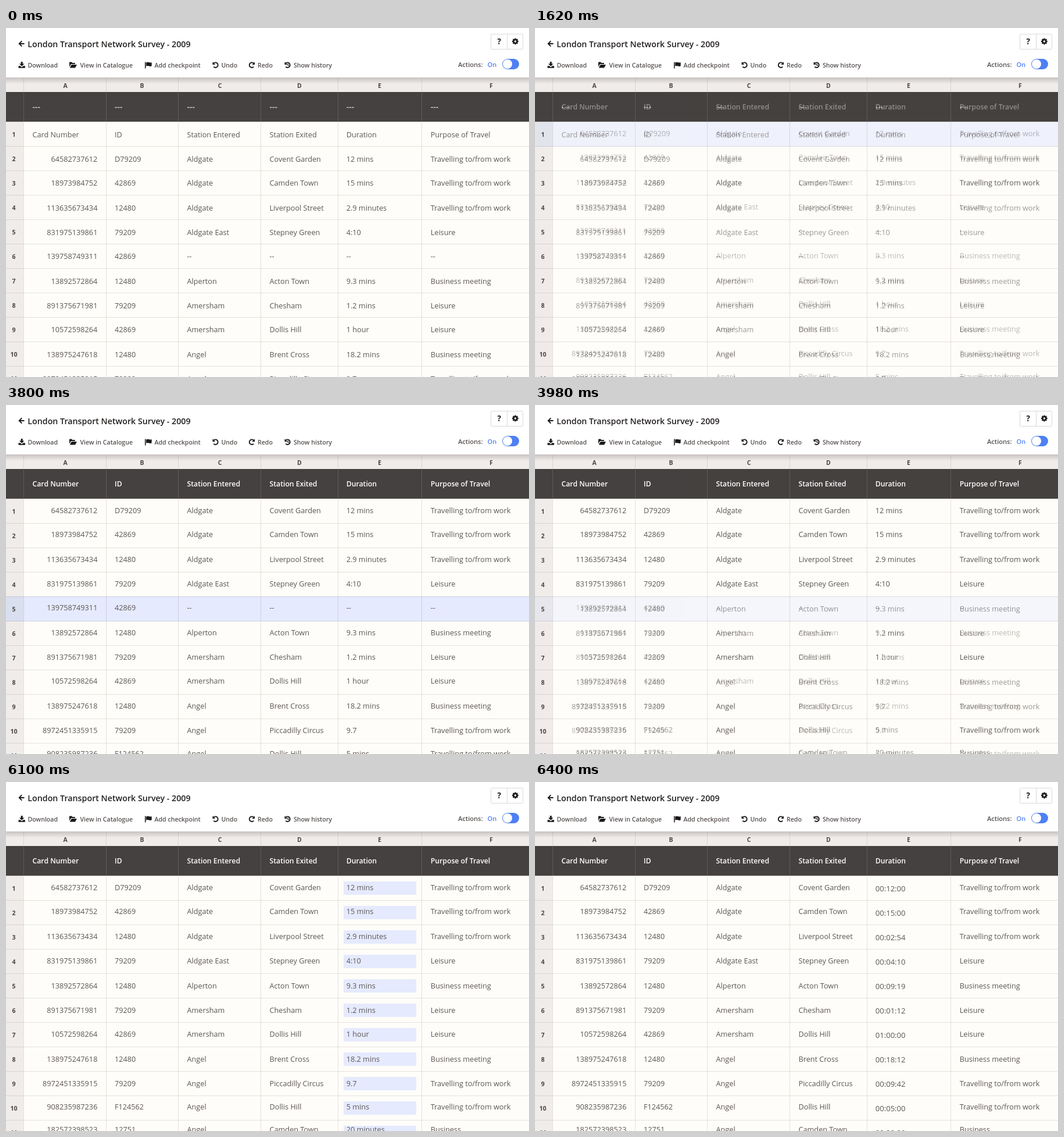
Write an HTML page that moves like this. It is 900 px wide and 600 px high and loops after 8.4 s.

```html
<!DOCTYPE html>
<html lang="en">
<head>
<meta charset="utf-8">
<title>Survey table</title>
<style>
  html, body { margin: 0; width: 100%; height: 100%; overflow: hidden; background: #fff; }
  svg { display: block; width: 900px; height: 600px; font-family: "Open Sans", "Noto Sans", sans-serif; }
  .cell { font-size: 12.7px; fill: #5b5654; }
  .time { font-size: 13.1px; }
  .head { font-size: 12.25px; font-weight: 600; fill: #fff; }
  .blank { font-size: 14px; font-weight: 600; fill: #d8d4d2; }
  .label { font-size: 10.5px; font-weight: 700; fill: #4b4644; text-anchor: middle; }
  .tool { font-size: 10.6px; font-weight: 600; fill: #55504e; }
  .title { font-size: 14.25px; font-weight: 600; fill: #23201f; }
  .end { text-anchor: end; }
  .ink { fill: #1c1a19; }
  .stroke { fill: none; stroke: #1c1a19; stroke-width: 1.9; }
</style>
</head>
<body>
<svg id="stage" viewBox="0 0 900 600"></svg>
<script>
const LOOP = 8400;
const ROW = 42;
const TOP = 161;
const edges = [30, 172, 296, 438, 571, 715];
const textX = [45.5, 187, 311.5, 453.5, 585.7, 730.7];
const headings = ['Card Number', 'ID', 'Station Entered', 'Station Exited', 'Duration', 'Purpose of Travel'];
const WORK = 'Travelling to/from work', MEETING = 'Business meeting';

const rows = [
  headings,
  ['64582737612', 'D79209', 'Aldgate', 'Covent Garden', '12 mins', WORK, '00:12:00'],
  ['18973984752', '42869', 'Aldgate', 'Camden Town', '15 mins', WORK, '00:15:00'],
  ['113635673434', '12480', 'Aldgate', 'Liverpool Street', '2.9 minutes', WORK, '00:02:54'],
  ['831975139861', '79209', 'Aldgate East', 'Stepney Green', '4:10', 'Leisure', '00:04:10'],
  ['139758749311', '42869', '--', '--', '--', '--'],
  ['13892572864', '12480', 'Alperton', 'Acton Town', '9.3 mins', MEETING, '00:09:19'],
  ['891375671981', '79209', 'Amersham', 'Chesham', '1.2 mins', 'Leisure', '00:01:12'],
  ['10572598264', '42869', 'Amersham', 'Dollis Hill', '1 hour', 'Leisure', '01:00:00'],
  ['138975247618', '12480', 'Angel', 'Brent Cross', '18.2 mins', MEETING, '00:18:12'],
  ['8972451335915', '79209', 'Angel', 'Piccadilly Circus', '9.7', WORK, '00:09:42'],
  ['908235987236', 'F124562', 'Angel', 'Dollis Hill', '5 mins', WORK, '00:05:00'],
  ['182572398523', '12751', 'Angel', 'Camden Town', '20 minutes', 'Business', '00:20:00']
];
const EMPTY_ROW = 5;

const rect = (x, y, w, h, fill, extra = '') =>
  `<rect x="${x}" y="${y}" width="${w}" height="${h}" fill="${fill}" ${extra}/>`;
const text = (x, y, cls, s) => `<text x="${x}" y="${y}" class="${cls}">${s}</text>`;
const path = (d, cls = 'ink', extra = '') => `<path d="${d}" class="${cls}" ${extra}/>`;
const times = (n, fn) => Array.from({ length: n }, (_, i) => fn(i)).join('');

// Baseline of a row before any rows have been removed.
const rowY = i => 188 + ROW * i - (i % 3 === 2 ? 1 : 0) - (i === 11 ? 1 : i === 12 ? 5 : 0);

// removed: how many rows are gone; mark: highlighted row; tint: shade durations; clock: show hh:mm:ss
function table({ removed = 0, mark = -1, tint = false, clock = false }) {
  let out = rect(0, 110, 900, 490, '#fffdf9') + rect(0, TOP, 30, 439, '#f0ecea');
  if (mark >= 0) {
    const y = TOP + ROW * mark;
    out += rect(30, y, 870, ROW + 1, '#e5eafe') + rect(0, y, 30, ROW + 1, '#d9dfef');
  }
  const line = 'rgba(62,50,46,.13)';
  out += times(11, i => rect(0, TOP + ROW * i, 900, 1, line));
  out += edges.map(x => rect(x, TOP, 1, 439, line)).join('');
  if (tint) out += times(11, i => rect(581, 171 + ROW * i, 125, 23, '#e5eafe'));

  out += rect(0, 110, 900, TOP - 110, '#454140');
  out += edges.map(x => rect(x, 110, 1, TOP - 110, '#5f5a58')).join('');
  out += headings.map((h, c) => removed
    ? text(textX[c], 140, 'head', h)
    : text(textX[c], 140, 'blank', '---')).join('');

  out += times(11, i => text(13.5, 187 + ROW * i, 'label', i + 1));
  rows.forEach((row, i) => {
    if (removed && i === 0 || removed > 1 && i === EMPTY_ROW) return;
    const closed = removed > 1 && i > EMPTY_ROW;
    const y = rowY(i) - (removed ? 44 : 0) - (closed ? 41 : 0);
    const slot = i - (removed ? 1 : 0) - (closed ? 1 : 0);
    if (y > 616) return;
    row.slice(0, 6).forEach((s, c) => {
      if (c === 0 && i > 0) out += text(157.4, y, 'cell end', s);
      else if (c === 4 && clock) out += text(textX[c], 188 + ROW * slot, 'cell time', row[6]);
      else out += text(textX[c], y, 'cell', s);
    });
  });
  return out;
}

function toolbar() {
  const turn = 'M1.6 3.2A4.3 4.3 0 1 1 1.8 8.9';
  const head = 'M0 .6V5.2H4.7Z';
  const at = (x, y, s, flip = 1) => `<g transform="translate(${x} ${y}) scale(${flip} 1)">${s}</g>`;
  const undo = path(turn, 'stroke') + path(head);
  const teeth = times(8, i => rect(-1.2, -5.4, 2.4, 3, '#1c1a19', `transform="rotate(${i * 45})"`));
  const names = [[38, 'Download'], [128, 'View in Catalogue'], [256, 'Add checkpoint'],
    [371, 'Undo'], [433.5, 'Redo'], [495.5, 'Show history']];
  return rect(0, 0, 900, 86, '#fff')
    + path('M31.5 27H23.5M27.3 22.4L22.7 27L27.3 31.6', 'stroke', 'stroke-width="2.2"')
    + text(37.3, 32.6, 'title', 'London Transport Network Survey - 2009')
    + names.map(([x, s]) => text(x - .5, 67.7, 'tool', s)).join('')
    + at(21.5, 58, path('M4.2 0H7.2V3.6H10L5.7 7.8L1.4 3.6H4.2ZM0 7.2H3.2L5.7 9.5L8.2 7.2H11.4V10.8H0Z'))
    + at(109, 58.5, path('M0 8.5V1Q0 0 1 0H4L5.2 1.4H9Q10 1.4 10 2.4V3.6H3.6Q2.6 3.6 2 4.7ZM.8 10L3.2 5.2Q3.6 4.5 4.4 4.5H13L10.5 9.3Q10.1 10 9.3 10Z'))
    + at(239, 58, path('M0 .6H1.5V11.5H0ZM2.2 1.4Q4.6 .1 6.9 1.1T11.7 .9V7.3Q9.4 8.5 7.1 7.5T2.2 7.7Z'))
    + at(355.5, 57.7, undo) + at(428, 57.7, undo, -1)
    + at(479.5, 57.7, undo + path('M5.5 3.4V6.4H7.8', 'stroke', 'style="stroke-width:1.2"'))
    + rect(834.5, 10.5, 55, 26, '#fff', 'stroke="#dcd9d7" rx="1"') + rect(862, 11, 1, 25, '#dcd9d7')
    + text(848.7, 28, 'label', '<tspan font-size="13.5" fill="#1c1a19">?</tspan>')
    + at(876.4, 23, teeth + '<circle r="2.9" fill="none" stroke="#1c1a19" stroke-width="2.4"/>')
    + text(778, 66.7, 'tool', '<tspan font-size="11.1">Actions:</tspan>')
    + text(828.5, 66.7, 'tool', '<tspan font-size="11" fill="#4e80f5">On</tspan>')
    + rect(854, 53, 29, 18, '#4e80f5', 'rx="9"') + '<circle cx="863" cy="62" r="8" fill="#fff"/>';
}

function columnBar() {
  const centres = [102, 234, 368, 505, 643, 835];
  return rect(0, 85, 900, 25, '#f0ecea')
    + edges.map(x => rect(x, 86, 1, 24, '#d9d5d2')).join('')
    + rect(0, 85, 900, 11, 'url(#shade)')
    + centres.map((x, i) => text(x, 102.8, 'label', 'ABCDEF'[i])).join('');
}

// Each scene covers the one before it; fade is the length of the stepped blend that ends at `start`.
const scenes = [
  { start: 0 },
  { start: 1500, mark: 0 },
  { start: 1800, fade: 300, removed: 1 },
  { start: 3800, removed: 1, mark: 4 },
  { start: 4100, fade: 300, removed: 2 },
  { start: 6100, removed: 2, tint: true },
  { start: 6400, fade: 300, removed: 2, clock: true }
];

const stage = document.getElementById('stage');
stage.innerHTML = '<defs><linearGradient id="shade" x2="0" y2="1">'
  + '<stop stop-color="#4a403c" stop-opacity=".24"/><stop offset="1" stop-color="#4a403c" stop-opacity="0"/>'
  + '</linearGradient></defs>'
  + scenes.map(s => `<g class="scene">${table(s)}</g>`).join('')
  + toolbar() + columnBar();

stage.querySelectorAll('.scene').forEach((layer, i) => {
  const { start, fade = 0 } = scenes[i];
  if (!start) return;
  const animation = layer.animate([
    { opacity: 0, offset: 0 },
    { opacity: 0, offset: (start - fade) / LOOP, easing: 'steps(5, end)' },
    { opacity: 1, offset: start / LOOP },
    { opacity: 1, offset: 1 }
  ], { duration: LOOP, iterations: Infinity });
  animation.startTime = 0;
});
</script>
</body>
</html>
```
